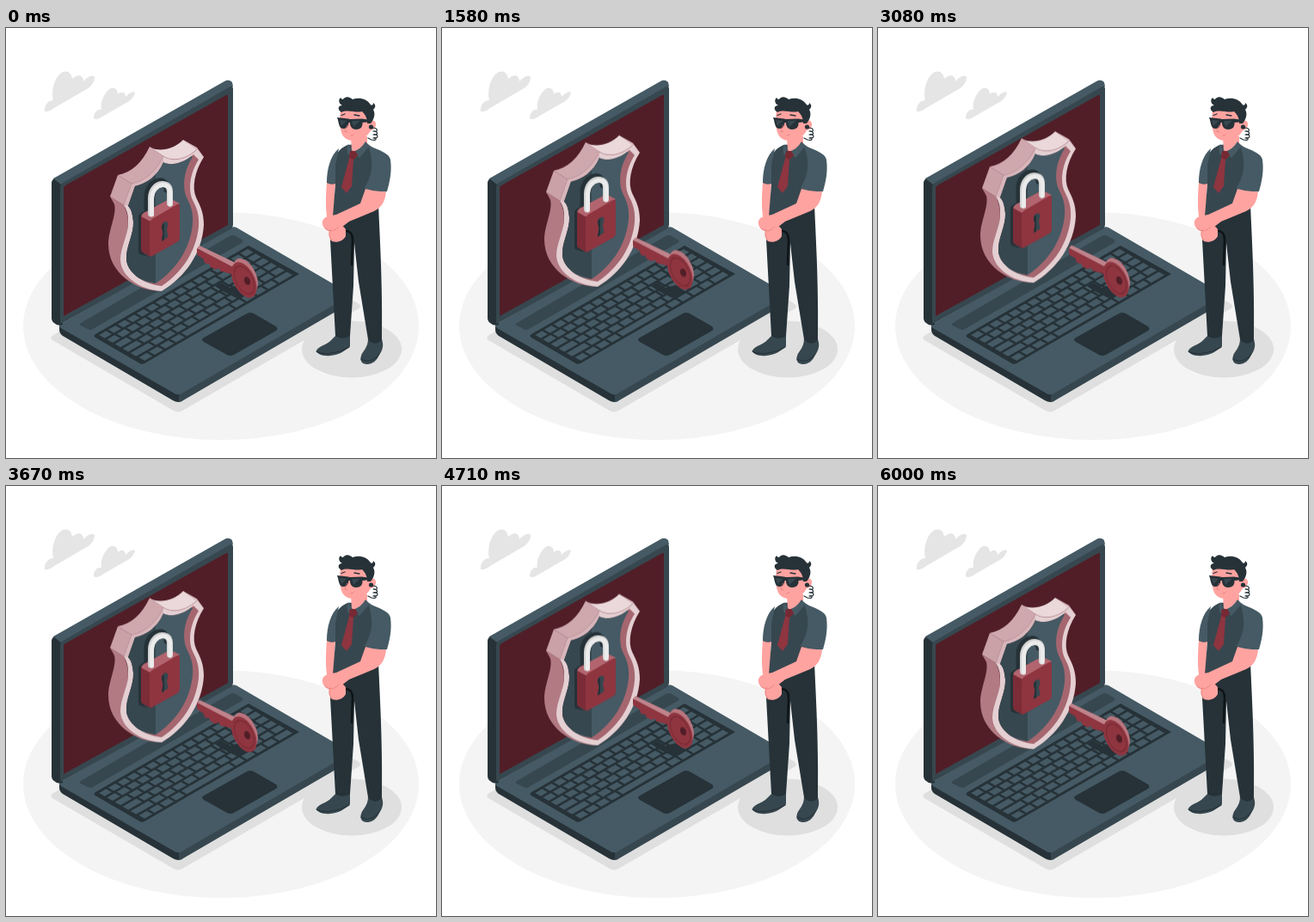
These frames come from a looping animation (500 by 500 pixels, 6.04 s). An HTML page:

```html
<!DOCTYPE html>
<html lang="en">
<head>
<meta charset="utf-8">
<title>Laptop security</title>
<style>
  html, body { margin: 0; width: 100%; height: 100%; overflow: hidden; background: #fff; }
  svg { display: block; width: 100vw; height: 100vh; }
  .float { animation: float 6040ms linear infinite; }
  .key { animation-duration: 3020ms; }
  @keyframes float { 50% { transform: translateY(-10px); } }
  .ink { fill: #263238; }
  .mid { fill: #37474f; }
  .slate { fill: #455a64; }
  .red { fill: #8e3540; }
  .skin { fill: #ffa3a0; }
  .line { fill: none; stroke-linecap: round; stroke-linejoin: round; }
</style>
</head>
<body>
<svg viewBox="0 0 500 500">
  <defs>
    <path id="opening" d="M142 207 L150 184 C164 181 176 172 183 156 C191 161 207 157 218 147 L224 153
      C213 170 212 189 217 200 C222 210 225 217 224 231 C221 260 205 284 181 300
      C160 298 142 285 140 270 C139 254 149 240 148 225 C147 216 146 211 142 207Z"/>
    <clipPath id="inside"><use href="#opening"/></clipPath>
  </defs>

  <!-- Floor and clouds -->
  <ellipse cx="250" cy="346.500" rx="230" ry="132.500" fill="#f4f4f4"/>
  <g fill="#e5e5e5">
    <path d="M45 97 C44 90 49 84 55 84 C52 70 58 55 66 51 C72 49 76 52 77 59 C83 53 90 54 90 62 C94 57 101 54 103 57 C103 64 98 69 92 72 L56 93 C51 97 47 98 45 97Z"/>
    <path d="M102 105 C102 99 106 94 111 95 C109 86 115 74 122 70 C127 69 130 72 130 77 C135 73 139 75 139 80 C144 75 148 73 150 75 C149 81 143 86 138 88 L112 103 C108 106 104 107 102 105Z"/>
  </g>
  <ellipse cx="402" cy="373.500" rx="58" ry="33" fill="#dfdfdf"/>
  <path d="M55 357 L264 238 L409 320 Q415 324 409 327 L205 445 Q200 448 195 445 L54 363 Q50 360 55 357Z" fill="#dfdfdf"/>

  <!-- Laptop base -->
  <path class="ink" d="M62 346 L201 426 V435 Q197 435 194 433 L66 358 Q62 355 62 351Z"/>
  <path class="mid" d="M201 425 L398 311 V319 Q398 321 395 323 L206 433 Q204 435 201 435Z"/>
  <path class="slate" d="M64 344 L260 233 Q264 230 268 232 L395 306 Q401 310 395 314 L206 424 Q201 428 196 425 L64 349 Q60 346 64 344Z"/>
  <path class="mid" d="M87 343 L260 242 Q264 240 267 242 L274 246 Q277 248 274 250 L101 350 Q98 352 95 350 L87 346 Q84 345 87 343Z"/>
  <path class="ink" d="M104 356 L282 253 L341 286 L161 390 Q157 392 154 389 L104 360 Q101 358 104 356Z"/>
  <g id="keys" class="slate"></g>
  <path class="ink" d="M230 360 L280 332 Q284 330 288 332 L314 347 Q317 350 314 352 L265 380 Q261 382 257 380 L230 365 Q226 362 230 360Z"/>
  <path class="ink" d="M243 300 L250 296 L260 302 L272 299 L284 307 L270 315 L258 309 L252 306Z"/>

  <!-- Laptop lid -->
  <path class="ink" d="M53 180 Q53 177 57 174 L66 180 V345 Q60 347 56 343 Q53 341 53 337Z"/>
  <path class="slate" d="M55 175 L254 62 Q259 59 263 63 L264 68 L64 182Z"/>
  <path class="mid" d="M63 185 Q63 182 66 180 L259 69 Q264 66 264 71 V229 Q264 232 261 234 L66 343 Q63 345 63 341Z"/>
  <path d="M67 186 Q67 184 69 183 L256 78 Q258 77 258 79 V229 L67 335Z" fill="#511e27"/>

  <!-- Shield and padlock -->
  <g class="float">
    <path d="M121 196 L137 206 C145 222 142 237 137 253 C133 276 151 303 181 306 C151 306 119 285 119 251 C119 235 129 217 126 205 Q124 201 121 196Z" fill="#b27a83"/>
    <path d="M121 196 L130 171 L146 181 L137 206Z" fill="#caa1a7"/>
    <path d="M130 171 C146 168 158 157 167 138 L183 149 C175 166 162 178 146 181Z" fill="#cfa8ae"/>
    <path d="M167 138 C177 145 196 141 206 130 L222 141 C210 153 193 156 183 149Z" fill="#ead8db"/>
    <path d="M206 130 L222 139 L230 150 L222 142Z" fill="#dabcc1"/>
    <path d="M137 206 L146 181 C162 178 175 166 183 149 C193 156 210 153 222 141 L230 150
      C219 167 216 186 221 197 C226 207 230 215 230 229 C228 262 208 290 181 306
      C154 304 134 288 133 270 C133 254 143 240 142 224 C142 216 140 211 137 206Z" fill="#e4cfd2"/>
    <path d="M137 206 L146 181 C162 178 175 166 183 149 L183 156 C176 172 164 181 150 184 L142 207Z" fill="#d7b6bb"/>
    <path class="line" d="M137 206 L146 181 C162 178 175 166 183 149 C193 156 210 153 222 141" stroke="#b98a91" stroke-width=".6"/>
    <use href="#opening" fill="#a5666f"/>
    <g clip-path="url(#inside)">
      <use href="#opening" class="slate" x="-7" y="-3"/>
      <path class="mid" d="M130 165 H174 V297 L150 290 L130 275Z"/>
    </g>
    <g class="ink">
      <path d="M154 218 L160 213 V262 L166 266 L156 263 Q154 262 154 259Z"/>
      <path class="line" d="M164 213 V196 C164 186 171 179 178 178 C184 177 187 182 187 188" stroke="#263238" stroke-width="7"/>
    </g>
    <path d="M157 220 Q157 217 160 215 L188 200 Q191 198 194 200 L202 204 L168 226Z" fill="#b3656f"/>
    <path d="M157 219 L168 225 V266 L159 261 Q157 260 157 257Z" fill="#7c2c37"/>
    <path class="red" d="M167 227 Q167 224 170 222 L199 205 Q202 204 202 207 V244 Q202 247 199 249 L170 265 Q167 267 167 263Z"/>
    <path class="line" d="M168.500 216 V198 C168.500 188 175 182 181 181.500 C188 181 190.500 185 190.500 191 V204" stroke="#d2d2d2" stroke-width="7"/>
    <path class="line" d="M169.500 217 V199 C169.500 189 176 183 182 182.500 C188 182 191 186 191 192 V205" stroke="#ebebeb" stroke-width="5"/>
    <path class="mid" d="M181 232 C180 226 188 222 188.500 228 Q188.500 231 187 234 L188.500 243 L181 248 L182.500 237 Q181 235 181 232Z"/>
    <path class="ink" d="M181 232 Q181 228 184 227 V246 L181 248 L182.500 237Z"/>
  </g>

  <!-- Key -->
  <g class="float key">
    <path class="red" d="M222 256 L265 277 V287 L255 284 L250 283 L247 279 L244 281 L238 278 L236 274 L232 274 L229 268 L224 265 Q222 264 222 262Z"/>
    <path d="M222 256 L225 253 L269 274 L264 278Z" fill="#c0838b"/>
    <circle r="18" transform="matrix(.8 .5 0 1 278.500 288)" fill="#b9757e"/>
    <circle r="18.500" transform="matrix(.8 .5 0 1 276.700 293)" fill="#8e3540"/>
    <circle r="14.500" transform="matrix(.8 .5 0 1 277 293)" fill="none" stroke="#742832"/>
    <ellipse cx="280.500" cy="294" rx="3.300" ry="5" transform="rotate(-20 280.500 294)" fill="#511e27"/>
  </g>

  <!-- Guard: legs and shoes -->
  <path class="mid" d="M384 357 L400 358 V370 C394 376 387 380 377 381 C369 382 361 379 361 375 C363 370 374 368 378 363Z"/>
  <path class="mid" d="M421 361 L437 362 C440 370 437 376 434 380 C431 387 426 391 420 391 C414 391 411 387 413 381 C415 375 421 372 421 361Z"/>
  <path class="line" d="M361 376 C368 381 387 378 399 371 M413 385 C420 390 429 386 434 379" stroke="#263238" stroke-width="1.200"/>
  <path class="ink" d="M380 209 L433 205 C435 250 438 300 437 363 C431 369 425 367 421 362 L410 295 L405 250 L404 300 L400 358 C394 362 387 361 383 358 L377 246Z"/>
  <path class="line" d="M396 236 Q403 237 403 246 L402 275" stroke="#0e1417" stroke-width="2.500"/>

  <!-- Guard: torso -->
  <path class="skin" d="M373 179 L383 181 C381 197 383 211 388 220 L374 224 C371 210 372 194 373 179Z"/>
  <path class="mid" d="M397 136 C388 140 382 147 381 158 L383 182 L380 219 C397 224 422 219 434 207 L437 180 L442 149 C433 142 424 138 419 134Z"/>
  <path class="slate" d="M387 140 C377 148 373 165 373 180 Q378 183 383 181 L383 160Z"/>
  <path class="slate" d="M421 137 C433 141 446 146 447 153 C449 167 446 180 443 190 Q428 192 417 186 C423 175 430 162 421 137Z"/>
  <path class="skin" d="M401 126 H420 V136 Q412 147 402 144Z"/>
  <path class="slate" d="M398 135 L403 143 L398 148 Q395 141 398 135Z M418 132 L423 137 L411 151 L403 144Q413 141 418 132Z"/>
  <path class="red" d="M400 143 L406 143 L409 148 L404 153 L402 184 L396 192 L390 185 L399 152Z"/>
  <path d="M400 143 L406 143 L409 148 L404 153 L399 151Z" fill="#762933"/>
  <path class="skin" d="M418 187 Q430 191 442 190 C441 201 437 209 428 213 L399 225 C392 230 387 236 380 237 C372 237 367 231 368 225 C369 219 378 218 384 217 L412 204Z"/>
  <path class="skin" d="M379 230 C385 227 392 229 395 234 V242 C392 248 385 250 379 248 Q374 244 376 236Z"/>
  <path class="line" d="M371 233 Q379 240 387 231 M379 247 Q374 241 377 234" stroke="#e9817f" stroke-width=".8"/>

  <!-- Guard: head -->
  <path class="skin" d="M390 91 C387 103 388 118 391 124 C394 130 402 132 408 131 C416 129 422 124 424 119 C430 119 432 110 428 108 C424 107 424 101 424 94 L407 88Z"/>
  <path class="ink" d="M390 98 C385 95 386 90 391 90 C387 88 386 84 389 81 C391 84 392 83 394 81 C397 79 401 81 403 83 C411 80 420 83 423 88 C425 91 427 90 427 87 C431 90 429 93 427 95 C430 100 428 106 424 111 L420 111 C420 105 418 101 414 97 C406 99 397 94 390 98Z"/>
  <path class="ink" d="M385 104 L398 105.500 L400 106 L414 105.500 L424 107 V109 L414.500 110 C415 115 412 118 407 118 C402 118 400 114 400 110 H398.500 C398 115 396 117 392 117 C388 117 387 112 386 107Z"/>
  <path d="M388 107 L396 108 L390 114Z M402 108 L412 107.500 L404 115Z" fill="#37474f"/>
  <path class="line" d="M390 101.500 L394 100 M405 101 L411 102" stroke="#263238" stroke-width="1.300"/>
  <path class="line" d="M397 113 L394 120 L397 121 M401 125 L404 124" stroke="#e47c7a" stroke-width=".8"/>
  <circle class="ink" cx="424.500" cy="115" r="2.600"/>
  <path class="line" d="M426 116 C433 116 433 122 427 120 C431 119 435 125 427 124 C432 122 435 129 427 128 C430 126 433 132 425 130 L421 128" stroke="#263238" stroke-width="1.200"/>
</svg>
<script>
  const keys = document.getElementById('keys');
  const point = (u, v) => `${103 + 179 * u + 57 * v} ${357 - 103.5 * u + 33 * v}`;

  function addKey(u1, u2, v1, v2) {
    const path = document.createElementNS('http://www.w3.org/2000/svg', 'path');
    path.setAttribute('d', `M${point(u1, v1)}L${point(u2, v1)}L${point(u2, v2)}L${point(u1, v2)}Z`);
    keys.append(path);
  }

  // Each row lists its first key's width and its number of equal keys.
  const rows = [[.06, 15], [.065, 14], [.09, 13], [.105, 13], [.13, 12]];
  const step = .96 / 6, gap = .014;
  rows.forEach(([first, count], r) => {
    const top = .045 + r * step, bottom = top + step - .045;
    const width = (.98 - first) / count;
    addKey(.015, first, top, bottom);
    for (let i = 0; i < count; i++) {
      const u = first + i * width;
      addKey(u + gap, u + width, top, bottom);
    }
  });
  const stops = [.005, .07, .14, .21, .28, .6, .67, .74, .81, .88, .98];
  stops.slice(1).forEach((end, i) => addKey(stops[i] + gap, end, .045 + 5 * step, .96));
</script>
</body>
</html>
```
